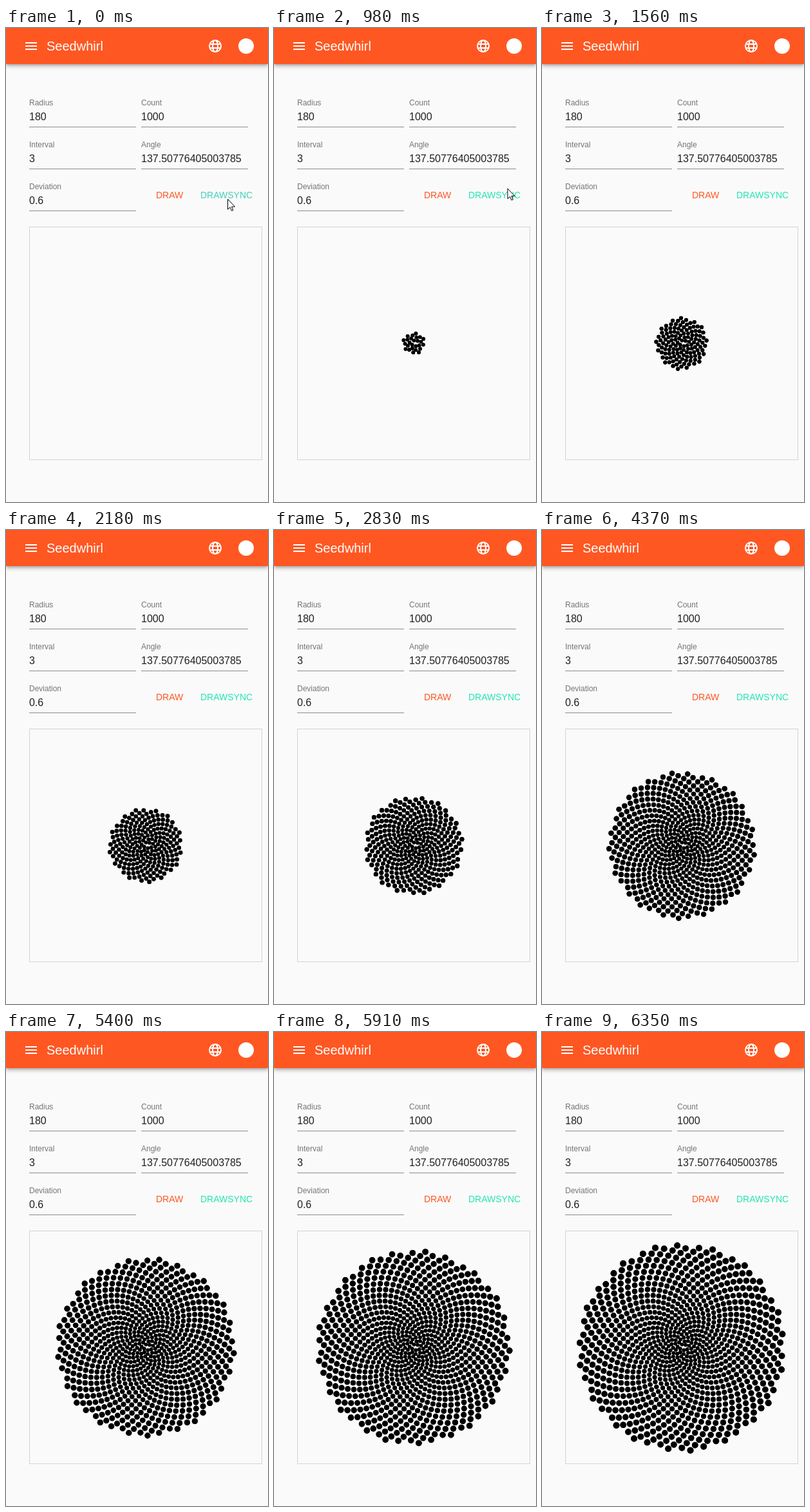
These frames come from a looping animation (407 by 735 pixels, 6410 ms). An HTML page with a canvas:

```html
<!DOCTYPE html>
<html lang="en">
<head>
<meta charset="utf-8">
<title>Seedwhirl</title>
<style>
  html, body { margin: 0; width: 100%; height: 100%; overflow: hidden; background: #fafafa; }
  header {
    position: absolute; width: 407px; height: 56px; background: #ff5722;
    box-shadow: 0 2px 4px -1px rgba(0,0,0,.2), 0 4px 5px rgba(0,0,0,.14), 0 1px 10px rgba(0,0,0,.12);
  }
  canvas, svg { position: absolute; left: 0; top: 0; }
  text { font-family: "Liberation Sans", Arial, sans-serif; }
  .title { font-size: 20px; fill: #fff; }
  .label { font-size: 12px; fill: #757575; }
  .value { font-size: 16px; fill: #212121; }
  .button { font-size: 14px; }
  .line { fill: #8c8c8c; }
</style>
</head>
<body>
<header></header>
<canvas id="stage" width="407" height="735"></canvas>
<svg id="ui" width="407" height="735" viewBox="0 0 407 735">
  <path d="M30 22h18v2h-18zM30 27h18v2h-18zM30 32h18v2h-18z" fill="#fff"/>
  <text class="title" x="63" y="35">Seedwhirl</text>
  <g fill="none" stroke="#fff" stroke-width="2">
    <circle cx="325" cy="28" r="9"/>
    <ellipse cx="325" cy="28" rx="4" ry="9"/>
    <path d="M317 25h16M317 31h16"/>
  </g>
  <circle cx="373" cy="28" r="12" fill="#fff"/>
  <g id="fields"></g>
  <text class="button" x="233" y="264" fill="#ff5722">DRAW</text>
  <text class="button" id="sync" x="302" y="264">DRAWSYNC</text>
  <rect x="36.5" y="308.5" width="361" height="361" fill="none" stroke="#d3d3d3"/>
  <path id="cursor" d="M.5 .5v15.8l3.6-3.4 2.5 5.6 2.3-1-2.4-5.4h5z" fill="#fff" stroke="#000"/>
</svg>
<script>
const LOOP = 6410, START = 870, STEP = 63.75;
const RADIUS = 180, COUNT = 1000, ANGLE = 137.50776405003785 * Math.PI / 180;
const CX = 217, CY = 489;

const ctx = document.getElementById('stage').getContext('2d');
const cursor = document.getElementById('cursor');
const sync = document.getElementById('sync');

const fields = [
  ['Radius', '180', 36, 120], ['Count', '1000', 210, 120],
  ['Interval', '3', 36, 185], ['Angle', '137.50776405003785', 210, 185],
  ['Deviation', '0.6', 36, 250]
];
document.getElementById('fields').innerHTML = fields.map(([label, value, x, y]) =>
  `<text class="label" x="${x}" y="${y}">${label}</text>
   <text class="value" x="${x}" y="${y + 23}">${value}</text>
   <rect class="line" x="${x}" y="${y + 33}" width="166" height="1"/>`).join('');

// Seeds grow outwards, so the squared radius is quadratic in the index.
function drawSeed(i) {
  const q = i / COUNT;
  const r = RADIUS * Math.sqrt(q * (0.319 + 0.493 * q));
  const a = i * ANGLE;
  ctx.beginPath();
  ctx.arc(CX + r * Math.cos(a), CY + r * Math.sin(a), 2.8 + 2.2 * q, 0, 2 * Math.PI);
  ctx.fill();
  ctx.fill();
}

function seedCount(t) {
  if (t < START) return 0;
  const step = Math.floor((t - START) / STEP + 0.4);
  return Math.floor(3.5 + 11.42 * step);
}

function cursorPos(t) {
  if (t < 190) return [344, 265];
  if (t < 550) return [345, 263];
  if (t < 620) return [345, 262];
  if (t < START) return [345, 260];
  const p = Math.min(1, (t - START) / 280);
  return [345 + 44 * p, 260 - 29 * p];
}

let drawn = 0;
function frame(now) {
  const t = now % LOOP;
  const n = seedCount(t);
  if (n < drawn) {
    ctx.clearRect(0, 0, 407, 735);
    drawn = 0;
  }
  while (drawn < n) drawSeed(++drawn);

  const [x, y] = cursorPos(t);
  cursor.setAttribute('transform', `translate(${x} ${y})`);
  cursor.style.display = t < 1200 ? '' : 'none';
  sync.setAttribute('fill', t < START ? '#45cfb7' : '#24e5b0');
  requestAnimationFrame(frame);
}

const begin = performance.now();
const tick = () => Math.max(0, performance.now() - begin);
(function run() {
  const raf = window.requestAnimationFrame;
  window.requestAnimationFrame = fn => raf(() => fn(tick()));
  frame(0);
})();
</script>
</body>
</html>
```
